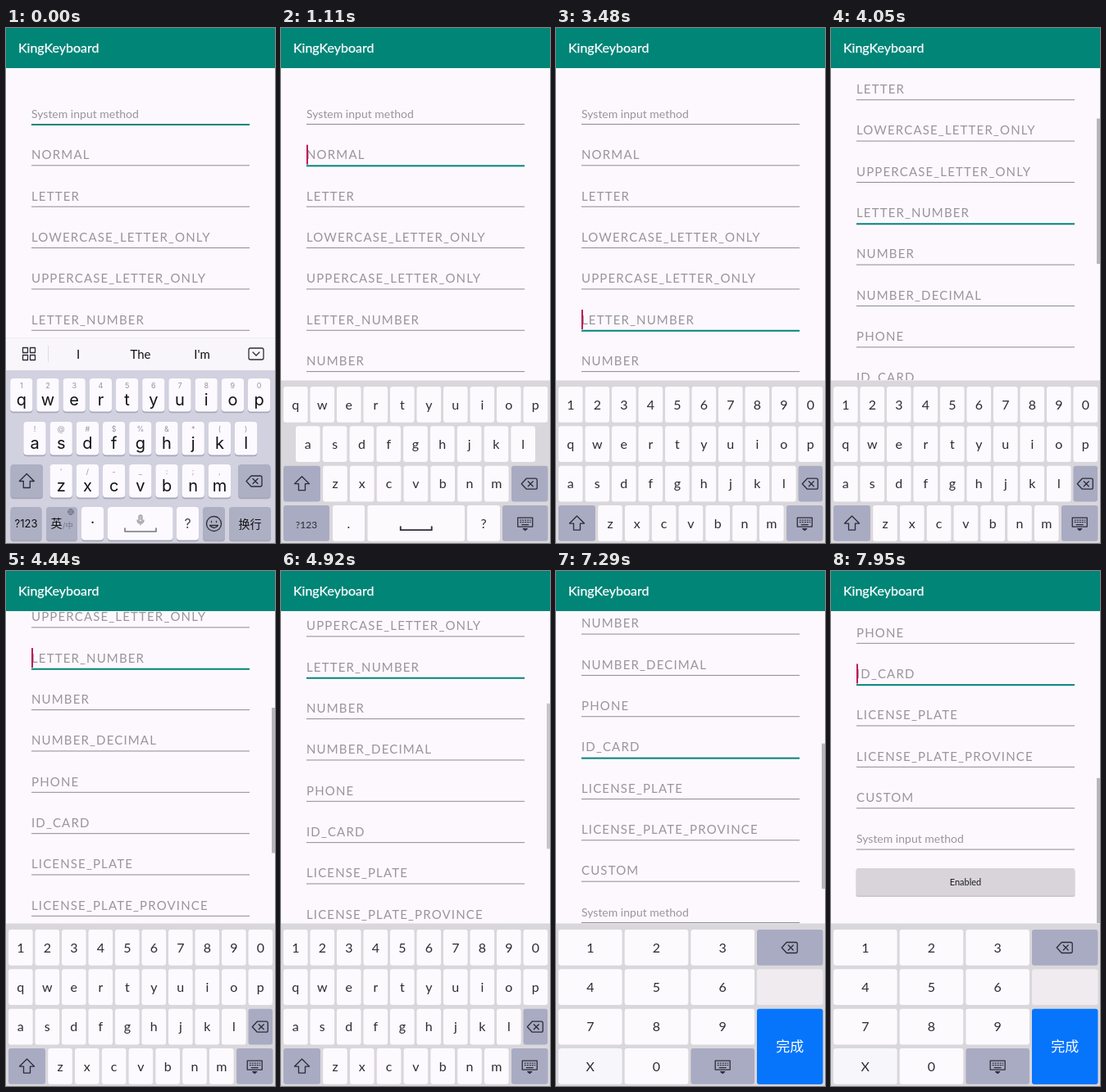
An HTML page for the animation above (8 s loop, 328 px wide and 629 px high).

```html
<!DOCTYPE html>
<html lang="en">
<head>
<meta charset="utf-8">
<title>KingKeyboard</title>
<style>
html, body { margin: 0; width: 100%; height: 100%; overflow: hidden; background: #fdf8fd; }
svg { display: block; width: 328px; height: 629px; font-family: Lato, "Noto Sans CJK SC", "Noto Sans CJK", sans-serif; }
.sys { font-family: Inter, "Noto Sans CJK SC", "Noto Sans CJK", sans-serif; }
.mid { text-anchor: middle; }
.icon { fill: none; stroke: #2c2c38; stroke-width: 1.3; stroke-linejoin: round; stroke-linecap: round; }
</style>
</head>
<body>
<svg id="stage" viewBox="0 0 328 629"></svg>
<script>
const stage = document.getElementById('stage');
const LOOP = 8000, PITCH = 50.35;

function el(tag, attrs, parent, text) {
  const n = document.createElementNS('http://www.w3.org/2000/svg', tag);
  for (const k in attrs) n.setAttribute(k, attrs[k]);
  if (text) n.textContent = text;
  parent.append(n);
  return n;
}
const box = (p, x, y, w, h, fill, rx = 0) => el('rect', { x, y, width: w, height: h, fill, rx }, p);
const label = (p, s, x, y, size, fill = '#2c2c34') =>
  el('text', { x, y, 'font-size': size, fill, class: 'mid' }, p, s);

const ICONS = {
  shift: 'M0-9L9 0H4V8H-4V0H-9Z',
  back: 'M-10 0L-4-6.5H7Q9-6.5 9-4.5V4.5Q9 6.5 7 6.5H-4ZM-2-3L4 3M4-3L-2 3',
  hide: 'M-9-7H9V4H-9ZM-6-4H-5M-3-4H-2M0-4H1M3-4H4M6-4H6.5M-6-1.5H-5M-3-1.5H-2M0-1.5H1M3-1.5H4M6-1.5H6.5M-4 1.5H4M-2.5 6.5H2.5L0 8.5Z',
  space: 'M-19-2V2H19V-2',
  grid: 'M-7-7H-1V-1H-7ZM2-7H8V-1H2ZM-7 2H-1V8H-7ZM2 2H8V8H2Z',
  fold: 'M-7-7H7Q9-7 9-5V5Q9 7 7 7H-7Q-9 7-9 5V-5Q-9-7-7-7ZM-4-2L0 2L4-2',
  mic: 'M0-6Q2-6 2-4V0Q2 2 0 2Q-2 2-2 0V-4Q-2-6 0-6ZM-4 0Q-4 4 0 4Q4 4 4 0M0 4V6',
  face: 'M9 0A9 9 0 1 1-9 0A9 9 0 1 1 9 0M-3-3V-2M3-3V-2M-5 2Q0 8 5 2Z',
  globe: 'M3.5 0A3.5 3.5 0 1 1-3.5 0A3.5 3.5 0 1 1 3.5 0M-3.5 0H3.5M0-3.5Q3 0 0 3.5Q-3 0 0-3.5'
};
function icon(p, name, x, y, style = '') {
  return el('path', { d: ICONS[name], class: 'icon', transform: `translate(${x} ${y})`, style }, p);
}

// Form
box(stage, 0, 0, 328, 629, '#fdf8fd');
const list = el('g', {}, stage);
const FIELDS = ['System input method', 'NORMAL', 'LETTER', 'LOWERCASE_LETTER_ONLY', 'UPPERCASE_LETTER_ONLY',
  'LETTER_NUMBER', 'NUMBER', 'NUMBER_DECIMAL', 'PHONE', 'ID_CARD', 'LICENSE_PLATE',
  'LICENSE_PLATE_PROVINCE', 'CUSTOM', 'System input method'];
const lines = FIELDS.map((name, i) => {
  const y = i * PITCH, caps = name[1] !== 'y';
  el('text', { x: 31, y: y + 109.8, 'font-size': caps ? 15 : 14, 'letter-spacing': caps ? 1.15 : 0, fill: '#98959c' }, list, name);
  return box(list, 31, y + 117, 266, 1, '#8d8a92');
});
box(list, 30.5, 796, 267, 34, '#c9c6cb', 2);
box(list, 31, 795, 266, 33.5, '#d8d4d9', 2);
label(list, 'Enabled', 164, 816, 11, '#1c1c20');
const cursor = box(list, 31, 92.3, 2, 24, '#bd1a5c');
const thumb = box(stage, 324, 49, 4, 177.5, '#b9b6bb');
box(stage, 0, 0, 328, 49, '#008577');
el('text', { x: 15, y: 29.5, 'font-size': 16, fill: '#fff', stroke: '#fff', 'stroke-width': .25 }, stage, 'KingKeyboard');

// System keyboard
const sys = el('g', { class: 'sys' }, stage);
box(sys, 0, 378, 328, 40, '#f9f6fb');
box(sys, 0, 378, 328, .8, '#ebe8ee');
box(sys, 0, 418, 328, 211, '#d2d1df');
box(sys, 51, 388, 1, 20, '#dedbe2');
icon(sys, 'grid', 27.5, 397.5);
icon(sys, 'fold', 305, 398);
[['I', 88], ['The', 164], ["I'm", 239]].forEach(([s, x]) =>
  label(sys, s, x, 403.5, 15, '#111').setAttribute('font-family', 'Lato, sans-serif'));

function sysKey(x, y, w, dark) {
  box(sys, x, y + 1.2, w, 41, '#a6a6b9', 4);
  box(sys, x, y, w, 40.5, dark ? '#adafc3' : '#fcfaff', 4);
}
function sysRow(chars, hints, x0, y) {
  [...chars].forEach((c, i) => {
    const x = x0 + i * 32.2;
    sysKey(x - 13.6, y, 27.2);
    label(sys, hints[i], x, y + 11.5, 9, '#96949c');
    label(sys, c, x, y + 33, 20, '#111');
  });
}
sysRow('qwertyuiop', '1234567890', 18.8, 428);
sysRow('asdfghjkl', '!@#$%&*()', 35, 481);
sysRow('zxcvbnm', "'/-_:;,", 67.2, 533);
sysKey(5.5, 533, 39.5, 1); icon(sys, 'shift', 25.3, 553.5);
sysKey(283, 533, 39.5, 1); icon(sys, 'back', 303, 553.5);
[[5.5, 38, 1], [49, 38, 1], [92, 27], [124, 79.5], [208, 27], [240, 27, 1], [272, 51, 1]]
  .forEach(([x, w, dark]) => sysKey(x, 585, w, dark));
label(sys, '?123', 24.5, 610, 13, '#111');
label(sys, '英', 61.5, 610, 14, '#111');
label(sys, '/中', 75.5, 611, 9.5, '#77778a');
icon(sys, 'globe', 79, 591, 'stroke:#666678;stroke-width:.8');
label(sys, '·', 105.5, 610, 18, '#111');
icon(sys, 'mic', 164, 601, 'stroke:#a5a3ac;fill:#c4c2ca');
icon(sys, 'space', 164, 613, 'stroke:#77757e;stroke-width:1.6');
label(sys, '?', 221.5, 611, 16, '#444');
icon(sys, 'face', 253.5, 605.5);
label(sys, '换行', 297.5, 610.5, 14, '#111');

// In-app keyboards
const app = el('g', {}, stage);
box(app, 0, 430, 328, 1.5, '#e9e6eb');
box(app, 0, 431, 328, 198, '#dad7dc');
const rowY = r => 438 + r * 48.35;
const DARK = '#a9abc2', WHITE = '#fcfafd';

function key(p, r, x, w, s, fill) {
  const y = rowY(r), c = x + w / 2;
  const art = ICONS[s];
  box(p, x, y, w, 43.7, fill || (art && s !== 'space' ? DARK : WHITE), 3);
  if (s === 'space') icon(p, s, c, y + 28, 'stroke-width:1.8;stroke-linejoin:miter');
  else if (art) icon(p, s, c, y + 22);
  else if (s) label(p, s, c, y + 27.5, s.length > 1 ? 12 : 16);
}
function row(p, r, chars, x0 = 3, step = 32.5, w = 29.6) {
  [...chars].forEach((c, i) => key(p, r, x0 + i * step, w, c));
}
const board = () => el('g', {}, app);

function letters(plain) {
  const b = board();
  row(b, 0, 'qwertyuiop');
  row(b, 1, 'asdfghjkl', 18, 32.8);
  key(b, 2, 3, 45, 'shift');
  row(b, 2, 'zxcvbnm', 51.2, 32.8);
  key(b, 2, 281, 44.5, 'back');
  if (plain) {
    key(b, 3, 3, 274.5, 'space');
    key(b, 3, 281, 44.5, 'hide');
  } else {
    key(b, 3, 3, 56, '?123', DARK);
    key(b, 3, 63, 39, '.');
    key(b, 3, 105.5, 118.5, 'space');
    key(b, 3, 227, 40, '?');
    key(b, 3, 270, 55.5, 'hide');
  }
  return b;
}
function alphabet(upper) {
  const b = board();
  ['abcdefg', 'hijklmn', 'opqrst', 'uvwxyz'].forEach((s, r) =>
    row(b, r, upper ? s.toUpperCase() : s, 3, 46.25, 43.4));
  key(b, 2, 280.5, 45, 'back');
  key(b, 3, 280.5, 45, 'hide');
  return b;
}
function mixed() {
  const b = board();
  ['1234567890', 'qwertyuiop', 'asdfghjkl'].forEach((s, r) => row(b, r, s));
  key(b, 2, 295.5, 29.6, 'back');
  key(b, 3, 3, 45, 'shift');
  row(b, 3, 'zxcvbnm', 51.2, 32.8);
  key(b, 3, 281, 44.5, 'hide');
  return b;
}
function digits(extra) {
  const b = board();
  ['123', '456', '789'].forEach((s, r) => row(b, r, s, 3, 80.7, 77.6));
  key(b, 3, 3, 77.6, extra, '#f7f6fa');
  key(b, 3, 83.7, 77.6, '0');
  key(b, 3, 164.4, 77.6, 'hide');
  key(b, 0, 245, 80.5, 'back');
  key(b, 1, 245, 80.5, '', '#efebef');
  box(b, 245, rowY(2), 80.5, 92.2, '#0675fc', 3);
  label(b, '完成', 285.3, 587, 17, '#fff');
  return b;
}
const boards = [null, letters(false), letters(true), alphabet(false), alphabet(true), mixed(),
  digits(''), digits('.'), digits('−'), digits('X')];

// Timeline: time at which each field takes focus
const TAPS = [0, 810, 1530, 2220, 2820, 3450, 4980, 5580, 6180, 6720];
// Times at which the cursor turns on or off, starting off
const BLINKS = [150, 510, 810, 1320, 1530, 1890, 2220, 2580, 2820, 3150, 3450, 3750, 4110, 4470, 4830,
  4860, 4980, 5340, 5580, 5940, 6180, 6510, 6720, 7050, 7440];
const SCROLL = [[3720, 0], [3840, 28], [4050, 130], [4260, 225], [4440, 250], [4560, 246], [4800, 239],
  [7020, 239], [7110, 262], [7260, 330], [7440, 395], [7620, 424], [7830, 432]];

const clamp = v => Math.max(0, Math.min(1, v));
const ramp = (t, a, b) => clamp((t - a) / (b - a));
const easeOut = u => 1 - (1 - u) ** 2;

function slope(i) {
  const a = SCROLL[i - 1], b = SCROLL[i], c = SCROLL[i + 1];
  if (!a || !c || (b[1] - a[1]) * (c[1] - b[1]) <= 0) return 0;
  return (c[1] - a[1]) / (c[0] - a[0]);
}
function scrollAt(t) {
  const n = SCROLL.findIndex(p => p[0] > t);
  if (n === 0) return 0;
  if (n < 0) return SCROLL[SCROLL.length - 1][1];
  const [t0, a] = SCROLL[n - 1], [t1, b] = SCROLL[n];
  const d = t1 - t0, u = (t - t0) / d, v = 1 - u;
  return a * v * v * (1 + 2 * u) + b * u * u * (3 - 2 * u)
    + d * u * v * (slope(n - 1) * v - slope(n) * u);
}
const shift = (n, y) => n.setAttribute('transform', `translate(0 ${y.toFixed(2)})`);
const show = (n, on) => n.setAttribute('visibility', on ? 'visible' : 'hidden');

function draw(t) {
  const focus = TAPS.filter(v => v <= t).length - 1;
  const y = scrollAt(t);
  shift(list, -y);
  lines.forEach((n, i) => {
    n.setAttribute('height', i === focus ? 2 : 1);
    n.setAttribute('fill', i === focus ? '#00857a' : '#8d8a92');
  });
  shift(cursor, focus * PITCH);
  show(cursor, BLINKS.filter(v => v <= t).length % 2);
  shift(thumb, y * .472);
  thumb.setAttribute('opacity', t < 3750 ? 0 : t < 7050 ? 1 - ramp(t, 4860, 5130) : 1);
  shift(sys, 252 * ramp(t, 840, 1020) ** 1.5);
  show(sys, t < 1020);
  shift(app, 200 * (1 - easeOut(ramp(t, 900, 1110))));
  show(app, t >= 900);
  boards.forEach((b, i) => b && b.setAttribute('display', i === focus ? 'inline' : 'none'));
}

const start = performance.now();
function tick() {
  draw((performance.now() - start) % LOOP);
  requestAnimationFrame(tick);
}
tick();
</script>
</body>
</html>
```
